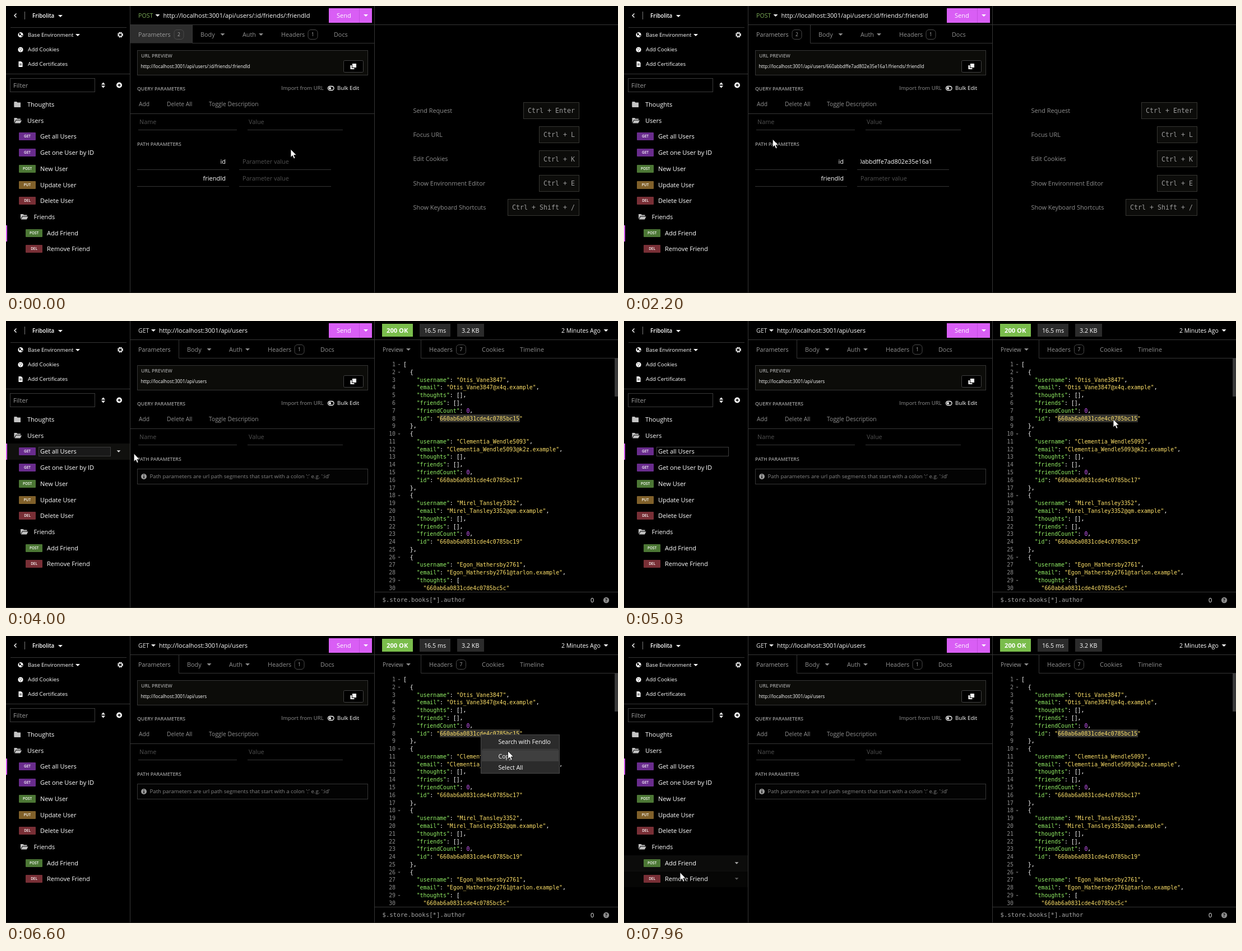
Write an HTML page that moves like this. It is 1092 by 513 pixels and loops after 8000 ms.

```html
<!DOCTYPE html>
<html lang="en">
<head>
<meta charset="utf-8">
<title>API client</title>
<style>
  html, body { margin: 0; width: 100%; height: 100%; overflow: hidden; background: #000; }
  svg { display: block; width: 1092px; height: 513px; }
  text { font-family: "Open Sans", "Noto Sans", sans-serif; white-space: pre; }
  .mono { font-family: "DejaVu Sans Mono", "Noto Sans Mono", monospace; }
</style>
</head>
<body>
<svg id="stage" viewBox="0 0 1092 513"></svg>
<script>
const LOOP = 8000;
const stage = document.getElementById('stage');
const WHITE = '#fff', GRAY = '#8f8f8f', DIM = '#515151', RULE = '#353535', ACCENT = '#d95ef5';

// ---- drawing helpers ----
function add(parent, tag, attrs = {}) {
  const node = document.createElementNS('http://www.w3.org/2000/svg', tag);
  for (const key in attrs) node.setAttribute(key, attrs[key]);
  return parent.appendChild(node);
}
const group = (parent = stage) => add(parent, 'g');
const rect = (g, x, y, width, height, fill, more = {}) =>
  add(g, 'rect', { x, y, width, height, fill, ...more });
const box = (g, x, y, w, h, fill = 'none', stroke = RULE, rx = 0) =>
  rect(g, x + .5, y + .5, w - 1, h - 1, fill, { stroke, rx });
const path = (g, d, fill = WHITE, more = {}) => add(g, 'path', { d, fill, ...more });
const line = (g, d, stroke = RULE, width = 1) =>
  path(g, d, 'none', { stroke, 'stroke-width': width });
const circle = (g, cx, cy, r, fill = WHITE) => add(g, 'circle', { cx, cy, r, fill });
const caret = (g, x, y, fill = WHITE, s = 4) => path(g, `M${x - s} ${y - s / 2}h${2 * s}l${-s} ${s}z`, fill);

// y is the middle of the capital letters; the baseline sits on a whole pixel
function text(g, x, y, string, size = 11, fill = WHITE, more = {}) {
  const node = add(g, 'text', { x, y: Math.round(y + size * .36), 'font-size': size, fill, ...more });
  node.textContent = string;
  return node;
}
const label = (g, x, y, s) => text(g, x, y, s, 8.7, '#9c9c9c', { 'font-weight': 600 });
const show = (node, opacity) => node.setAttribute('opacity', +opacity);

// ---- sidebar ----
const BADGES = { GET: '#692c8d', POST: '#4c7735', PUT: '#80602a', DEL: '#782f36' };
const rowY = n => Math.round(176 + 28.72 * n);
const side = group();

function hoverRow(n) {
  const g = group(side);
  rect(g, 0, rowY(n) - 14, 221, 29, '#10100e');
  caret(g, 201, rowY(n), '#ddd', 3.4);
  return g;
}
const bar = n => rect(side, 0, rowY(n) - 14, 2, 29, ACCENT);
const hovers = { all: hoverRow(2), add: hoverRow(8), remove: hoverRow(9) };
const bars = { all: bar(2), add: bar(8) };
const nameBox = box(side, 58, 225, 129, 17, '#191919', '#3d3d3d');
const nameOutline = box(side, 58, 225, 129, 17, 'none', '#3d3d3d');

line(side, 'M221.5 0V513M8 38.5H215M0 121.5H221');
line(side, 'M18.5 13.5L15 17L18.5 20.5', WHITE, 1.4);
line(side, 'M33.5 10V24', '#777');
text(side, 47, 17, 'Fribolita', 9.8, WHITE, { 'font-weight': 600 });
caret(side, 97, 18);

circle(side, 26, 51.5, 4.6);
path(side, 'M23 48l3 1 1 2-3 2zM27 52l3 0-2 3z', '#000');
text(side, 39, 51.5, 'Base Environment', 9.6);
caret(side, 128, 52);
circle(side, 204, 51.5, 2.8, 'none').setAttribute('stroke', WHITE);
add(side, 'circle', { cx: 204, cy: 51.5, r: 3.7, fill: 'none', stroke: WHITE, 'stroke-width': 2.6, 'stroke-dasharray': '2 .9' });
circle(side, 26, 78, 4.6);
for (const [x, y] of [[24.5, 76.5], [27.5, 77], [25.5, 80]]) circle(side, x, y, .8, '#000');
text(side, 39, 78, 'Add Cookies', 9.7);
path(side, 'M22.5 99h4.5l2.5 2.5v7.5h-7z');
line(side, 'M24 103.5h4M24 105.5h4', '#000', .8);
text(side, 39, 104, 'Add Certificates', 9.7);

box(side, 7, 129, 152, 25, '#000', '#3a3a3a');
text(side, 13, 142, 'Filter', 11.2, '#9a9a9a');
path(side, 'M170 140.5l3.5-4 3.5 4zM170 142.5l3.5 4 3.5-4z');
circle(side, 202, 141.5, 5);
line(side, 'M199.4 141.5h5.2M202 138.9v5.2', '#000', 1.4);

function folder(x, y, name, open) {
  path(side, `M${x} ${y - 5}h4.5l1.5 1.6h5.5v2h-8.5l-3 5.4z`, '#c4c4c4');
  path(side, open ? `M${x + 3.5} ${y - .6}h10l-2.6 5.2h-10z` : `M${x} ${y - 3}h11.5v8h-11.5z`, '#c4c4c4');
  text(side, x + 23.5, y + .4, name);
}
folder(14.5, rowY(0), 'Thoughts', false);
folder(14.5, rowY(1), 'Users', true);
folder(26, rowY(7), 'Friends', true);

[[2, 'GET', 'Get all Users'], [3, 'GET', 'Get one User by ID'], [4, 'POST', 'New User'],
 [5, 'PUT', 'Update User'], [6, 'DEL', 'Delete User'], [8, 'POST', 'Add Friend'],
 [9, 'DEL', 'Remove Friend']].forEach(([n, method, name]) => {
  const x = n > 7 ? 35 : 23, y = rowY(n);
  rect(side, x, y - 7, 30, 14, BADGES[method], { rx: 1 });
  text(side, x + 15, y - .4, method, 6.4, '#fff', { 'text-anchor': 'middle', 'font-weight': 600 });
  text(side, x + 38, y + .4, name);
});

// ---- request pane ----
const request = group();
line(request, 'M657.5 0V513M222 33.5H1092M222 192.5H657');
rect(request, 576, 4, 77, 26, ACCENT);
line(request, 'M630.5 4v26', '#c44de0');
text(request, 590, 17, 'Send', 11, '#fff', { 'font-weight': 500 });
caret(request, 642, 17, '#fff');
box(request, 234, 79, 412, 45, '#0c0c09');
label(request, 241, 88.5, 'URL PREVIEW');
box(request, 602, 97, 36, 22, '#000', '#414141', 2);
const copyIcon = group(request);
rect(copyIcon, 614.5, 106, 7, 7, WHITE);
rect(copyIcon, 617.5, 102.5, 8, 8, WHITE, { stroke: '#000' });
label(request, 234, 147.5, 'QUERY PARAMETERS');
text(request, 491, 147, 'Import from URL', 9.7, GRAY);
rect(request, 574.5, 143.5, 10.5, 7, 'none', { rx: 3.5, stroke: WHITE, 'stroke-width': 1.3 });
circle(request, 578, 147, 2);
text(request, 591, 147, 'Bulk Edit', 9.6);
text(request, 237, 175.5, 'Add', 10.3, GRAY);
text(request, 287, 175.5, 'Delete All', 10.3, GRAY);
text(request, 362, 175.5, 'Toggle Description', 10.3, GRAY);
text(request, 238, 207, 'Name', 10.8, DIM);
text(request, 433, 207, 'Value', 10.8, DIM);
line(request, 'M236 221.5H412M431 221.5H601');
label(request, 234, 247, 'PATH PARAMETERS');

function countBadge(g, x, n) {
  box(g, x - 9, 42, 18, 18, 'none', '#4a4a4a', 5);
  text(g, x, 50.8, n, 8.5, '#aaa', { 'text-anchor': 'middle' });
}
function requestHead(g, method, color, urlX, url, tabEnd, shift) {
  text(g, 236, 17, method, 10.6, color);
  caret(g, urlX - 10, 17);
  text(g, urlX, 17, url, 11);
  line(g, `M${tabEnd + .5} 34V66.5H657`);
  text(g, 236, 51, 'Parameters', 10.7, '#9c9c9c');
  [[347, 'Body'], [422, 'Auth'], [491, 'Headers'], [585, 'Docs']]
    .forEach(([x, s]) => text(g, x - shift, 51, s, 10.8, GRAY));
  caret(g, 386.5 - shift, 51, GRAY);
  caret(g, 455 - shift, 51, GRAY);
  countBadge(g, 547.5 - shift, '1');
}

const HOST = 'http://localhost:3001/api/users';
const USER_ID = '660abbdffe7ad802e35e16a1';
const addView = group();
const tabFill = rect(addView, 222, 34, 110, 32.5, '#2d2d2d');
requestHead(addView, 'POST', '#7bab57', 280.5, HOST + '/:id/friends/:friendId', 332, 0);
countBadge(addView, 308.5, '2');
[['id', 278.5], ['friendId', 308.5]].forEach(([name, y]) => {
  text(addView, 392, y, name, 11, WHITE, { 'text-anchor': 'end' });
  line(addView, `M234 ${y + 14}H398M416 ${y + 14}H580`);
});
text(addView, 422, 308, 'Parameter value', 10.8, DIM);
const placeholder = text(addView, 422, 278.5, 'Parameter value', 10.8, DIM);
const clip = add(add(stage, 'defs'), 'clipPath', { id: 'field' });
rect(clip, 422, 265, 156, 26, '#fff');
const pasted = text(add(addView, 'g', { 'clip-path': 'url(#field)' }), 550, 278.5, USER_ID, 10.8, WHITE, { 'text-anchor': 'end' });
const textCaret = rect(addView, 422, 270, 1, 16, '#fff');

const hints = group(addView);
[['Send Request', 'Ctrl + Enter'], ['Focus URL', 'Ctrl + L'], ['Edit Cookies', 'Ctrl + K'],
 ['Show Environment Editor', 'Ctrl + E'], ['Show Keyboard Shortcuts', 'Ctrl + Shift + /']]
  .forEach(([name, keys], i) => {
    const y = 187 + i * 43.2, width = keys.length * 7 + 16;
    text(hints, 726.5, y, name, 10.9, GRAY);
    box(hints, 1023 - width, Math.round(y) - 15, width, 30, '#0c0c0a', '#363632');
    text(hints, 1031 - width, y, keys, 11.63, '#9a9a9a', { class: 'mono' });
  });

// ---- list view with its response ----
const listView = group();
requestHead(listView, 'GET', '#e2e2e2', 273, HOST, 308, 24);
box(listView, 234, 264, 412, 28, '#030303');
circle(listView, 246, 278, 5, '#9a9a9a');
line(listView, 'M246 277v4M246 274.2v1.5', '#000', 1.4);
text(listView, 256.5, 277.5, "Path parameters are url path segments that start with a colon ':' e.g. ':id'", 9.63, '#858585');

function stat(x, width, string, fill, size, weight) {
  rect(listView, x, 5, width, 23, fill);
  text(listView, x + 8, 17, string, size, WHITE, { 'font-weight': weight });
}
stat(671, 55, '200 OK', '#7abd4c', 11.2, 700);
stat(738, 55, '16.5 ms', '#2b2b2b', 10.7, 400);
stat(805, 48, '3.2 KB', '#2b2b2b', 10.7, 400);
text(listView, 991, 17, '2 Minutes Ago', 10.5);
caret(listView, 1070.5, 17);
line(listView, 'M740.5 34V66.5H1092M658 484.5H1092');
text(listView, 672, 51, 'Preview', 10.2, '#9c9c9c');
caret(listView, 718, 51, GRAY);
text(listView, 755, 51, 'Headers', 10.7, GRAY);
countBadge(listView, 812, '7');
text(listView, 849, 51, 'Cookies', 11, GRAY);
text(listView, 917, 51, 'Timeline', 10.8, GRAY);
rect(listView, 1086, 67, 6, 68, '#393939');
text(listView, 671.5, 498.5, '$.store.books[*].author', 10.7, '#a5a5a5', { class: 'mono' });
text(listView, 1043, 499, '0', 10.8);
circle(listView, 1071, 499, 5.2, '#8d8d8d');
text(listView, 1071, 499, '?', 8, '#000', { 'text-anchor': 'middle', 'font-weight': 700 });

const ID_STEM = '660ab6a0831cde4c0785bc';
const USERS = [['Otis_Vane3847', 'x4q.example', '15'], ['Clementia_Wendle5093', 'k2z.example', '17'],
  ['Mirel_Tansley3352', 'qm.example', '19'], ['Egon_Hathersby2761', 'tarlon.example']];
const code = ['['];
for (const [name, domain, end] of USERS) {
  code.push('  {', `    "username": "${name}",`, `    "email": "${name}@${domain}",`);
  if (end) code.push('    "thoughts": [],', '    "friends": [],', '    "friendCount": 0,', `    "id": "${ID_STEM}${end}"`, '  },');
  else code.push('    "thoughts": [', `      "${ID_STEM}5c"`);
}
rect(listView, 774, 167, 143, 14, '#35342f');
const folds = group(listView);
code.forEach((source, i) => {
  const y = 77.5 + i * 13.785, size = 9.83;
  text(listView, 695, y, i + 1, size, '#8d8d8d', { class: 'mono', 'text-anchor': 'end' });
  const row = text(listView, 709, y, '', size, WHITE, { class: 'mono' });
  for (const token of source.match(/"[^"]*":?|\d+|[^"\d]+/g)) {
    const isKey = token.endsWith('":');
    const color = isKey ? '#93f066' : token[0] === '"' ? '#ffe26a' : /\d/.test(token) ? '#d05cff' : WHITE;
    const parts = isKey ? [[token.slice(0, -1), color], [':', WHITE]] : [[token, color]];
    for (const [s, fill] of parts) add(row, 'tspan', { fill }).textContent = s;
  }
  if (/[[{]$/.test(source)) caret(folds, 701.5, y + .5, '#666', 2.2);
});

// ---- URL preview ----
const preview = text(stage, 240.5, 108.5, '', 8.2, WHITE, { 'font-weight': 500 });

// ---- context menu ----
const menu = group();
box(menu, 847, 176, 141, 70, '#2b2b2b', '#474747');
const menuHover = rect(menu, 849, 204, 137, 20, '#3f3f3f');
line(menu, 'M850 202.5H985', '#474747');
[['Search with Fendlo', 189], ['Copy', 215], ['Select All', 235]]
  .forEach(([s, y]) => text(menu, 878.5, y, s, 10.6));
line(stage, 'M0 512.5H1092', '#24241f');

// ---- pointer ----
const pointer = group();
const outline = { stroke: '#000', 'stroke-width': .8 };
const arrow = path(pointer, 'M0 0V14.4L3.3 11.4 5.6 16.8 8 15.8 5.7 10.5H10.2Z', '#fff', outline);
const hand = path(pointer, 'M-2-.5Q0-2.2 2-.5V6.6L4 6.2 5.4 7.2 7 6.8 8.4 8.6V14L6.6 19.5H-2.2L-6.4 12Q-6 9.2-3.4 11L-2 12.6Z', '#fff', outline);
const beam = line(pointer, 'M-3-7.5Q0-7.5 0-6Q0-7.5 3-7.5M0-6.5V6.5M-3 7.5Q0 7.5 0 6Q0 7.5 3 7.5', '#fff', 1.1);

const linear = p => p, speedUp = p => p * p, slowDown = p => p * (2 - p), smooth = p => p * p * (3 - 2 * p);
// time, x, y, easing of the way there
const TRACK = [
  [30, 508, 256], [360, 470, 280, smooth], [1830, 470, 280], [2200, 266, 238, speedUp],
  [2600, 118, 237, slowDown], [3730, 118, 237], [4000, 226, 237, speedUp], [4530, 800, 180, slowDown],
  [4800, 873, 175.5, smooth], [5030, 873, 175.5], [5330, 847, 171, smooth], [5730, 847, 171],
  [5800, 848, 176, linear], [6400, 848, 176], [6600, 895.5, 205.5, slowDown], [6800, 896, 206],
  [6860, 903, 228, smooth], [6930, 906, 210, smooth], [7360, 906, 210], [7960, 100, 422.5, smooth], [LOOP, 100, 422.5],
];
function pointerAt(t) {
  const i = TRACK.findIndex(step => t < step[0]);
  if (i === 0) return TRACK[0].slice(1, 3);
  const [t0, x0, y0] = TRACK[i - 1], [t1, x1, y1, ease = linear] = TRACK[i];
  const p = ease((t - t0) / (t1 - t0));
  return [x0 + (x1 - x0) * p, y0 + (y1 - y0) * p];
}
const ramp = (t, from, to) => Math.min(1, Math.max(0, (t - from) / (to - from)));
const during = (t, from, to) => t >= from && t < to;

function render(t) {
  const [x, y] = pointerAt(t);
  pointer.setAttribute('transform', `translate(${x.toFixed(1)} ${y.toFixed(1)})`);
  const onRow = x < 221 && y > 219 && y < 248;
  const onField = y > 265 && y < 292 && x > 416 && x < 580 && t < 2600;
  show(hand, onRow);
  show(beam, onField);
  show(arrow, !onRow && !onField);

  const listed = t >= 3030, loaded = t >= 3200;
  show(addView, !listed);
  show(listView, listed);
  show(folds, loaded);
  show(copyIcon, listed && !loaded ? .45 : 1);
  show(tabFill, 1 - ramp(t, 30, 200));
  show(placeholder, t < 1100);
  show(pasted, t >= 1100);
  show(textCaret, during(t, 200, 730) || during(t, 1100, 1500));
  textCaret.setAttribute('x', t < 1100 ? 422 : 551);
  preview.textContent = listed ? (loaded ? HOST : '_')
    : `${HOST}/${t < 1200 ? ':id' : USER_ID}/friends/:friendId`;

  const picked = ramp(t, 3030, 3170);
  show(bars.all, picked);
  show(bars.add, 1 - picked);
  const hoverAll = ramp(t, 2350, 2500) * (1 - ramp(t, 4010, 4160));
  const focused = during(t, 2700, 5130);
  show(hovers.all, hoverAll);
  show(nameBox, focused ? hoverAll : 0);
  show(nameOutline, focused);
  show(hovers.add, ramp(t, 7780, 7860) * (1 - ramp(t, 7940, 8040)));
  show(hovers.remove, ramp(t, 7920, 8020));

  show(menu, during(t, 6060, 7130));
  show(menuHover, y > 203 && x > 848);
  menuHover.setAttribute('y', y > 224.5 ? 225 : 204);
}

const start = performance.now();
function tick() {
  render((performance.now() - start) % LOOP);
  requestAnimationFrame(tick);
}
tick();
</script>
</body>
</html>
```
